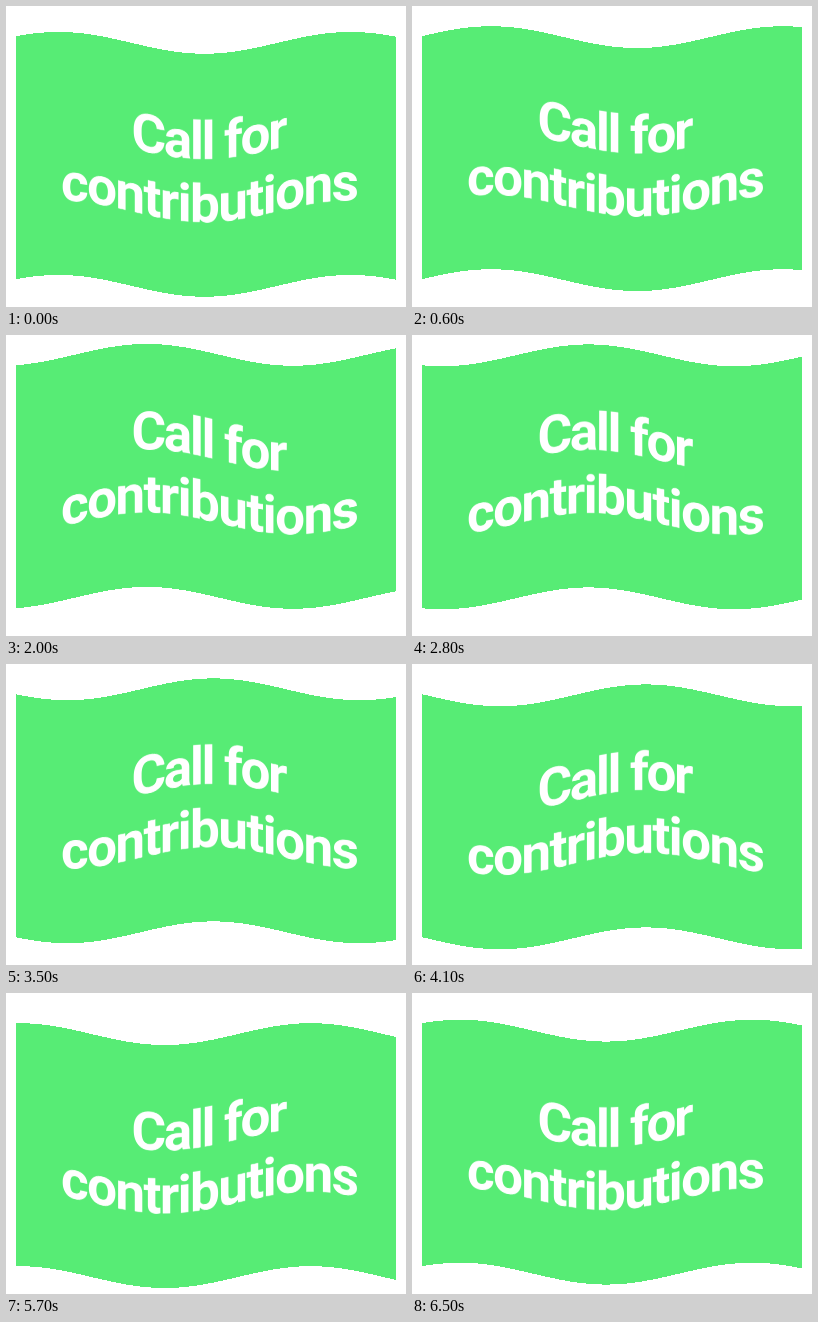
These frames come from a looping animation (400 by 301 pixels, 6.6 s). An HTML page with a canvas:

```html
<!DOCTYPE html>
<html lang="en">
<head>
<meta charset="utf-8">
<title>Call for contributions</title>
<style>
  html, body { margin: 0; width: 100%; height: 100%; overflow: hidden; background: #fff; }
  canvas { display: block; }
</style>
</head>
<body>
<canvas id="stage" width="400" height="301" role="img" aria-label="Call for contributions"></canvas>
<script>
const LOOP = 6600, STEP = 100;
const LEFT = 10, RIGHT = 390, TOP = 30.2, HEIGHT = 243;
const AMPLITUDE = 10.9, WAVELENGTH = 292, FIRST_CREST = 52.5;
const SCALE = 2;

const ctx = document.getElementById('stage').getContext('2d');
ctx.imageSmoothingQuality = 'high';

// The lettering is set flat once, then bent column by column.
const lettering = document.createElement('canvas');
lettering.width = 400 * SCALE;
lettering.height = HEIGHT * SCALE;
const pen = lettering.getContext('2d');
pen.scale(SCALE, SCALE);
pen.fillStyle = '#fff';
pen.font = '600 53px Roboto, "Open Sans", sans-serif';

function write(text, x, baseline, spacing) {
  pen.letterSpacing = spacing + 'px';
  pen.fillText(text, x, baseline);
}
write('Call for', 125.5, 105.5, -2.4);
write('contributions', 55, 168.5, -1.6);

const wave = (x, crest) => -AMPLITUDE * Math.cos(2 * Math.PI * (x - crest) / WAVELENGTH);

function draw(time) {
  const t = Math.floor(time / STEP) * STEP % LOOP;
  const crest = FIRST_CREST + WAVELENGTH * t / LOOP;
  const base = TOP - wave(LEFT, crest); // the left edge stays pinned
  ctx.clearRect(0, 0, 400, 301);
  ctx.fillStyle = '#57ec75';
  for (let x = LEFT; x < RIGHT; x++) {
    const y = base + wave(x + 0.5, crest);
    ctx.fillRect(x, Math.round(y), 1, HEIGHT);
    ctx.drawImage(lettering, x * SCALE, 0, SCALE, HEIGHT * SCALE, x, y, 1, HEIGHT);
  }
}

const start = performance.now();
function tick() {
  draw(performance.now() - start);
  requestAnimationFrame(tick);
}
tick();
</script>
</body>
</html>
```
